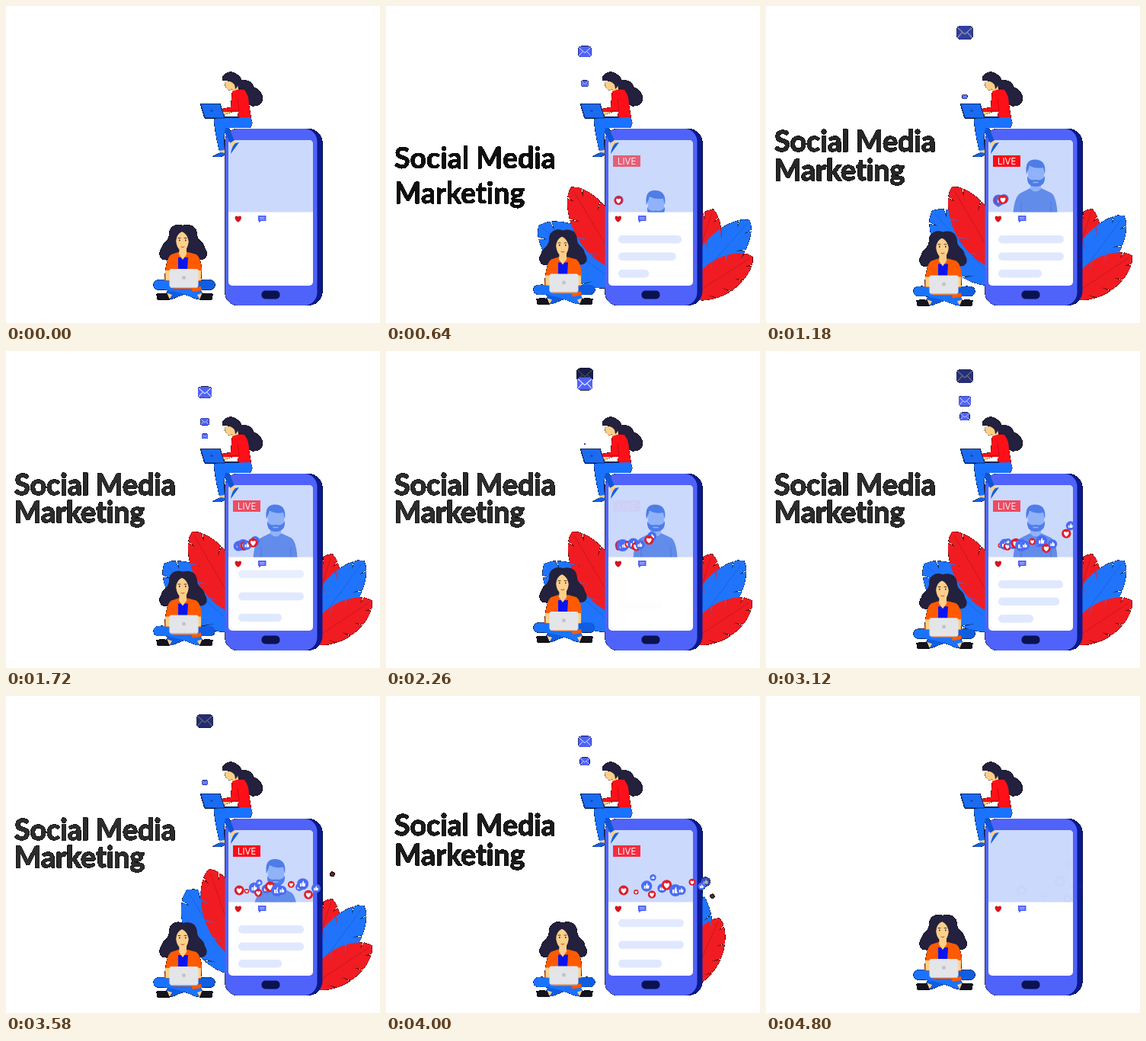
An HTML page for the animation above (4.82 s loop, 491 by 416 pixels).

```html
<!DOCTYPE html>
<html lang="en">
<head>
<meta charset="utf-8">
<title>Social Media Marketing</title>
<style>
html, body { margin: 0; width: 100%; height: 100%; overflow: hidden; background: #fff; }
svg { display: block; }
.title { font: 700 37.5px Lato, sans-serif; font-variant-ligatures: none; fill: #2d2d2d; stroke: #2d2d2d; stroke-width: 1; }
.live { font: 12.5px "Open Sans", sans-serif; fill: #fff; text-anchor: middle; }
.hair { fill: #23213d; }
.skin { fill: #fcd08a; }
.jeans { fill: #1a73ff; }
.line { fill: none; stroke-linecap: round; stroke-linejoin: round; }
</style>
</head>
<body>
<svg width="491" height="416" viewBox="0 0 491 416">
<defs>
  <!-- hard-edged transparency blended onto black -->
  <filter id="matte" filterUnits="userSpaceOnUse" x="0" y="0" width="491" height="416" color-interpolation-filters="sRGB">
    <feComponentTransfer in="SourceAlpha" result="mask"><feFuncA type="discrete" tableValues="0 1 1 1 1 1"/></feComponentTransfer>
    <feComposite in="SourceGraphic" in2="mask" operator="over"/>
    <feComposite in2="mask" operator="in"/>
  </filter>
  <clipPath id="video"><rect x="292" y="176" width="111" height="94.5"/></clipPath>
  <clipPath id="screen"><rect x="292" y="176" width="111" height="191" rx="5"/></clipPath>
  <path id="heart" d="M0 3C-5 -.6 -2.6 -4.6 0 -2C2.6 -4.6 5 -.6 0 3Z"/>
  <path id="thumb" d="M-3.4-.8H-1.6V3.2H-3.4ZM-1-.6L.3-3.8Q1.8-3.6 1-1H3.2Q3.6 1 2.6 3.2H-1Z"/>
  <g id="mail">
    <rect x="-10.7" y="-8.8" width="21.4" height="17.6" rx="5" fill="#4f63fa"/>
    <path class="line" stroke="#e3e8ff" stroke-width="1.2" d="M-9-6L0 2L9-6M-9 6L-3.5 0M9 6L3.5 0"/>
  </g>
</defs>
<g filter="url(#matte)">
  <g id="leaves"></g>

  <rect x="296" y="161" width="119.5" height="232" rx="19" fill="#0a1a8f"/>
  <rect x="287.5" y="161" width="121" height="232" rx="17" fill="#4f63fa"/>
  <g clip-path="url(#screen)">
    <path fill="#fff" d="M292 176h111v191H292z"/>
    <path fill="#cbd9fd" d="M292 176h111v94.5H292z"/>
  </g>
  <rect x="335.5" y="373.5" width="24" height="11" rx="5" fill="#0a1250"/>
  <g clip-path="url(#video)">
    <g id="man">
      <path fill="#628cea" d="M324 280Q325 249 335 245L347 239H361L374 245Q382 249 383 280Z"/>
      <path class="line" stroke="#4f7ae0" d="M335 257V272M374 257V272"/>
      <path fill="#8fb2f9" d="M347 230H361V240Q354 247 347 240ZM344 211H365V226Q364 236 354 236Q345 236 344 226Z"/>
      <path fill="#4f7de8" d="M342 221Q339 202 352 201.500Q369 201 366 221L364 212Q355 214 346 210ZM343 223Q345 230 354 228Q363 230 366 223Q367 237 354 237Q342 237 343 223Z"/>
      <path class="line" stroke="#8fb2f9" stroke-width="1.5" d="M351 231.500H357"/>
    </g>
  </g>
  <g id="live">
    <rect x="298" y="196" width="36" height="15" fill="#ff0a18"/>
    <text class="live" x="316" y="208">LIVE</text>
  </g>
  <use href="#heart" transform="translate(304.8 279.5) scale(1.45)" fill="#d8141c"/>
  <path fill="#4f63fa" d="M331 275H341.500V282H335L332 284.500V282H331Z"/>
  <path stroke="#cbd9fd" stroke-width=".8" d="M333 277.500H339.500M333 279.500H339.500"/>
  <g id="bars" fill="#dfe8fe"></g>

  <g id="upperWoman">
    <path class="hair" d="M297 87Q307 90 309 97Q323 97 325 106Q337 112 337 122Q335 133 322 131Q313 127 316 114Q311 107 304 109Z"/>
    <path class="skin" d="M287 99Q287 109 294 111L297 109V116L306 113L303 99Z"/>
    <path class="hair" d="M284 98Q283 88 295 86.500Q306 88 306 99Q304 107 301 109Q301 101 294 99Q288 97 284 98Z"/>
    <path class="skin" d="M294 134L284 139L286 143L297 139Z"/>
    <path fill="#ff1018" d="M297 112Q306 108 313 110Q319 117 319 130L322 148H304L305 139L284 139V135L295 133Z"/>
    <path class="line" stroke="#c90a14" d="M304 122L306 137L291 138"/>
    <path fill="#0f55d8" d="M283 158H292L300 177L295 181Z"/>
    <path class="skin" d="M294 180L300 176L304 181L298 190ZM280 188H287V194H280Z"/>
    <path fill="#1260e8" d="M295 194L306 179L301 180Q296 185 295 194ZM270.500 197.500Q279 193 282 192L288 193Q288 197 280 198Z"/>
    <path class="jeans" d="M273 149Q276 146 290 147L321 146Q326 155 320 160H288Q285 174 287 189L280 190Q274 165 273 149Z"/>
    <path class="line" stroke="#0b2a70" stroke-width="1.5" d="M287 146H306"/>
    <path fill="#1a6bf0" stroke="#0b2a70" d="M255.500 128.500H281L287 147H261Z"/>
    <circle cx="270" cy="137.5" r="1.6" fill="#0f49b8"/>
  </g>

  <g id="lowerWoman">
    <path class="line" stroke="#0f5de0" stroke-width="13" d="M268 366Q250 364 217 378"/>
    <path class="line" stroke="#1a73ff" stroke-width="13" d="M200 366Q218 364 251 378"/>
    <path class="skin" d="M212 377L218 379L215 384H209ZM257 377L251 379L254 384H260Z"/>
    <path fill="#15131f" d="M197.500 378Q205 376 212 378L215 385.500H199ZM271.500 378Q264 376 257 378L254 385.500H270Z"/>
    <path class="hair" d="M232 288C221 284 213 292 214 301C213 310 206 310 204 318C199 325 202 334 210 333Q220 338 228 329H238Q247 337 255 333C264 333 266 325 261 318C260 309 252 309 251 301C251 290 243 285 232 288Z"/>
    <path fill="#ff5a00" d="M226 323H239L250 326Q256 331 257 345L256 361H246L245 371H219L218 361L208 360Q210 330 217 326Z"/>
    <path fill="#0a14f0" d="M226 330H239L238 347H226Z"/>
    <path class="skin" d="M228 313H237V326L232 333L227 326Z"/>
    <path class="skin" d="M223 304Q226 297 231 296Q238 297 240 304Q240 320 231.500 322Q223 319 223 304Z"/>
    <path class="hair" d="M231 296Q224 299 223 309L220 304L226 292H238L242 303L240 309Q238 299 231 296Z"/>
    <path class="line" stroke="#3a2530" stroke-width=".9" d="M226 304.500H229M234 304.500H237"/>
    <path fill="#3a2530" d="M227 306.500h1.600v1.800h-1.600zM235 306.500h1.600v1.800h-1.600z"/>
    <path class="line" stroke="#d8402c" d="M230 316Q232 317.500 234 316"/>
    <path class="skin" d="M209 347H217V360H210ZM250 347H256L256 360H249Z"/>
    <path fill="#ff5a00" d="M243 370L256 368L257 373L245 375Z"/>
    <rect x="214.5" y="345" width="38" height="24" rx="2.5" fill="#e3e5e9"/>
    <path stroke="#bfc3ca" d="M216 369.500H251"/>
    <circle cx="233.5" cy="356.5" r="2.5" fill="#c2c4c9"/>
  </g>

  <g id="mails"></g>
  <g id="likes"></g>
  <text class="title" id="line1" x="11">Social Media</text>
  <text class="title" id="line2" x="11">Marketing</text>
</g>
</svg>
<script>
const LOOP = 4820;
const $ = id => document.getElementById(id);
const ramp = (a, b, t) => Math.min(1, Math.max(0, (t - a) / (b - a)));
const sine = p => (1 - Math.cos(Math.PI * p)) / 2;
const quad = p => p < .5 ? 2 * p * p : 1 - 2 * (1 - p) ** 2;
const back = p => 1 + 2.7 * (p - 1) ** 3 + 1.7 * (p - 1) ** 2;
const set = (el, attrs) => { for (const k in attrs) el.setAttribute(k, attrs[k]); };

function add(parent, tag, attrs, html = '') {
  const el = document.createElementNS('http://www.w3.org/2000/svg', tag);
  set(el, attrs);
  el.innerHTML = html;
  parent.append(el);
  return el;
}

// A broad leaf with thin slits, pointing up from its base at 0,0.
function leafShape(w, len, { fill, vein }) {
  const left = [], right = [];
  const edge = (u, inset, drop) => {
    const x = w * inset * (4 * u * (1 - u)) ** .7, y = -len * (u - drop);
    left.push(`${-x} ${y}`);
    right.unshift(`${x} ${y}`);
  };
  for (let i = 1; i < 24; i++) {
    edge(i / 24, 1, 0);
    if (i % 5 === 2 && i > 5) {
      edge(i / 24, .55, .07);
      edge(i / 24 + .015, 1, 0);
    }
  }
  return `<path fill="${fill}" d="M0 0L${left.join('L')}L0 ${-len}L${right.join('L')}Z"/>
    <path stroke="${vein}" stroke-width=".8" d="M0 0V${-len * .95}"/>`;
}

const RED = { fill: '#f01c22', vein: '#c81420', settle: 700 };
const BLUE = { fill: '#1f74fb', vein: '#1a60e0', settle: 850 };
// base x, base y, resting angle, half width, length, kind, angle to hide
const leaves = [
  [305, 365, -48.7, 33, 130, BLUE, 80],
  [307, 345, -30.2, 27, 125, RED, 52],
  [395, 370, 17.6, 25, 109, RED, -75],
  [400, 370, 36.4, 25, 118, BLUE, -75],
  [398, 382, 56.6, 23, 99, RED, -75]
].map(([x, y, angle, w, len, kind, hide]) =>
  ({ x, y, angle, hide, settle: kind.settle, el: add($('leaves'), 'g', {}, leafShape(w, len, kind)) }));

const bars = [[301, 86], [323.5, 86], [346, 57]].map(([y, w]) =>
  ({ y, w, el: add($('bars'), 'rect', { x: 305, height: 10.5, rx: 5 }) }));

const mails = [27, 330, 1064, 1340, 1505, 2236, 2550, 2690, 3387, 3570].map(start =>
  ({ start, el: add($('mails'), 'use', { href: '#mail' }) }));

// birth, vertical drift, radius, is heart; back to front
const likes = [
  [3270, 0, 6.5, 1], [2660, 8, 3.2, 1], [2310, -12, 7.2, 0], [2160, 10, 5.2, 1],
  [2130, -30, 4.2, 0], [1900, -4, 6, 0], [1790, -9, 6.8, 1], [1600, 0, 8, 0],
  [1480, 0, 6, 0], [1270, -9, 4.5, 1], [1100, -4, 5, 0], [1030, -8, 7.5, 0],
  [920, 5, 6, 1], [780, -2, 6, 0], [420, -22, 6, 0], [500, -14, 6.2, 1]
].map(([birth, drift, r, heart]) => ({
  birth, drift, r,
  el: add($('likes'), 'g', {}, `<circle r="7" fill="${heart ? '#df1f2b' : '#4a6cf4'}"/>
    <use href="#${heart ? 'heart' : 'thumb'}" fill="#fff" ${heart ? 'transform="translate(0 .8) scale(1.3)"' : ''}/>`)
}));

const bobKeys = [[0, 0], [1000, 9], [2250, -3], [3790, 10.5], [LOOP, 0]];
function bobAt(t) {
  const i = bobKeys.findIndex(k => k[0] > t);
  const [t0, y0] = bobKeys[i - 1], [t1, y1] = bobKeys[i];
  return y0 + (y1 - y0) * sine(ramp(t0, t1, t));
}

function drawLeaves(t) {
  leaves.forEach(({ x, y, angle, hide, settle, el }, i) => {
    const enter = back(ramp(0, settle, t));
    const leave = quad(i < 2 ? ramp(3400, 3950, t) : ramp(3650, 4400, t));
    const sway = i ? 0 : 7 * Math.sin(Math.PI * ramp(750, 1750, t)) ** 2;
    const turn = angle + hide * (1 - enter + leave) + sway;
    set(el, { transform: `translate(${x} ${y}) rotate(${turn})` });
  });
}

function drawPhone(t) {
  const h = t % (LOOP / 2);
  set($('live'), { opacity: ramp(200, 950, h) * (1 - ramp(1450, 2290, h)) });
  bars.forEach(({ y, w, el }, i) => {
    const grow = 1 - (1 - ramp(100 + i * 136, 900 + i * 136, h)) ** 3;
    const out = ramp(1270 + i * 165, 1950 + i * 165, h);
    set(el, { width: w * grow, y: y - 18 * sine(out), opacity: 1 - out ** 3 });
  });
  const drop = 72 * (1 - sine(ramp(360, 970, t)) + sine(ramp(3400, 4060, t)));
  set($('man'), { transform: `translate(0 ${drop})` });
}

function drawWoman(t) {
  set($('lowerWoman'), { transform: `translate(0 ${bobAt(t)})` });
}

function drawMails(t) {
  for (const { start, el } of mails) {
    const p = ramp(start, start + 1000, t);
    const y = 122 - 92 * sine(p);
    const size = (1 - (y - 36) * .0083) * Math.min(1, p * 12);
    set(el, { transform: `translate(261 ${y}) scale(${size})`, opacity: p ? 1 - ramp(.78, .98, p) : 0 });
  }
}

function drawLikes(t) {
  set($('likes'), { opacity: 1 - ramp(4150, LOOP, t) });
  for (const { birth, drift, r, el } of likes) {
    const s = Math.max(0, (t - birth) / 1000), fade = 1 - ramp(2.9, 3.15, s);
    const x = 305 + 13 * s * s;
    const y = 268 - 13 * sine(ramp(0, .15, s)) + drift * (s / 2.5) ** 2;
    const size = r / 7 * ramp(0, .15, s) * (.4 + .6 * fade);
    set(el, { transform: `translate(${x} ${y}) scale(${size})`, opacity: fade });
  }
}

function drawTitle(t) {
  [189, 225].forEach((y, i) => {
    const lag = i * 110;
    const rise = 148 * (1 - ramp(lag, 2100 + lag, t)) ** 5;
    const lift = 38 * ramp(3600 + lag, 4600 + lag, t) ** 2;
    set($('line' + (i + 1)), { y: y + rise - lift, opacity: ramp(300, 1300, t) * (1 - ramp(3600, 4600, t)) });
  });
}

function frame() {
  const t = performance.now() % LOOP;
  for (const draw of [drawLeaves, drawPhone, drawWoman, drawMails, drawLikes, drawTitle]) draw(t);
  requestAnimationFrame(frame);
}
frame();
</script>
</body>
</html>
```
